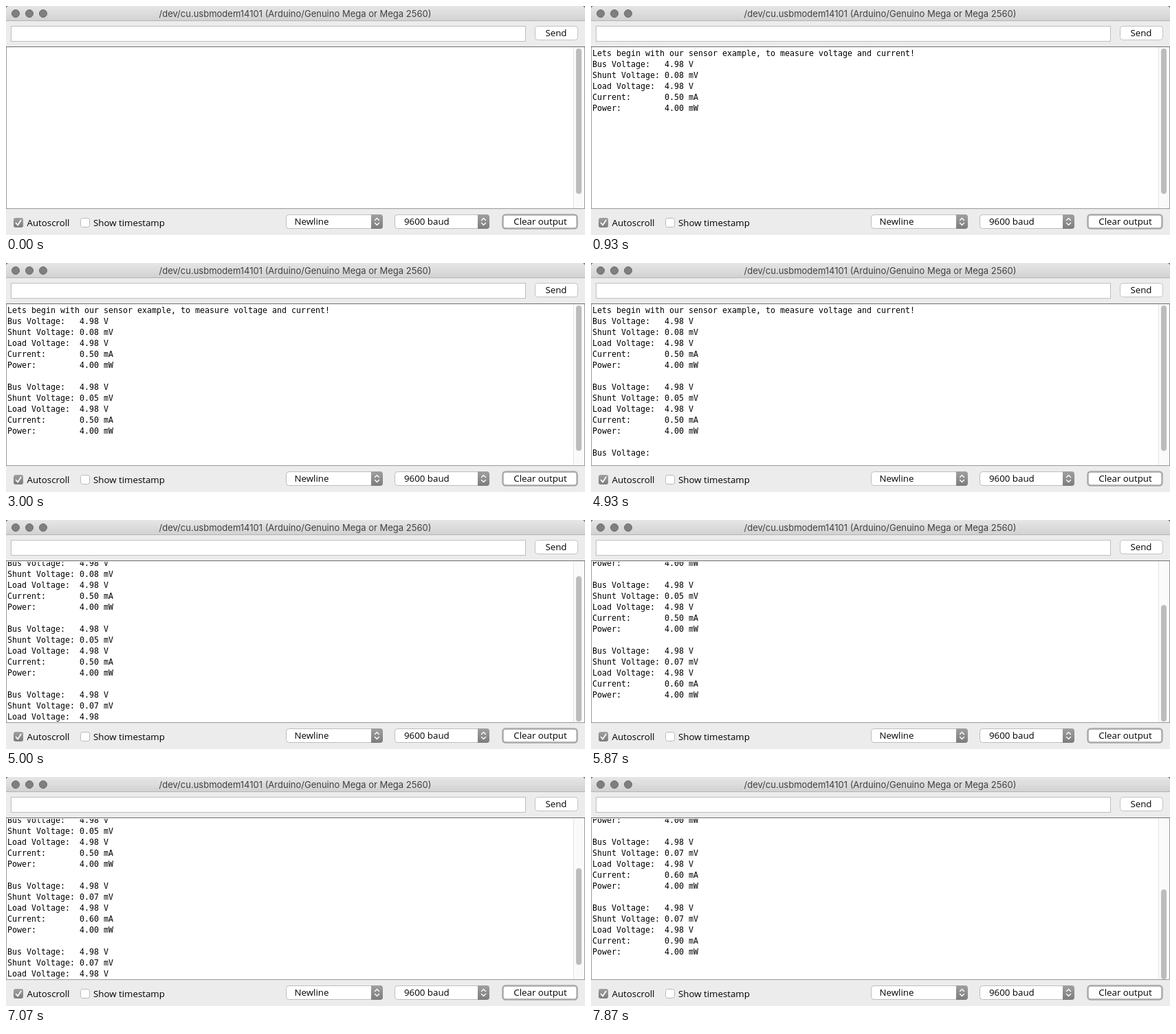
An HTML page for the animation above (8000 ms loop, 842x334 px).

```html
<!DOCTYPE html>
<html lang="en">
<head>
<meta charset="utf-8">
<title>Serial monitor</title>
<style>
  html, body { margin: 0; width: 100%; height: 100%; overflow: hidden; background: #ececec; }
  svg { position: absolute; left: 0; top: 0; }
  .ui { font: 500 13.3px "Open Sans", "Noto Sans", sans-serif; fill: #000; }
  .title { font: 13px Inter, "Liberation Sans", sans-serif; fill: #404040; }
  .mid { text-anchor: middle; }
  #view { position: absolute; left: 1px; top: 61px; width: 823px; height: 234px; overflow: hidden; }
  #log {
    position: absolute; left: 1px; top: 0; margin: 0; color: #000;
    font: 11.63px/16px "DejaVu Sans Mono", monospace;
  }
</style>
</head>
<body>
<svg width="842" height="334" viewBox="0 0 842 334">
  <defs>
    <linearGradient id="bar" x2="0" y2="1">
      <stop stop-color="#e6e6e6"/><stop offset="1" stop-color="#d2d2d2"/>
    </linearGradient>
    <linearGradient id="knob" x2="0" y2="1">
      <stop stop-color="#a0a0a0"/><stop offset="1" stop-color="#7c7c7c"/>
    </linearGradient>
    <g id="arrows">
      <path d="M0 0h13a4 4 0 0 1 4 4v13a4 4 0 0 1-4 4H0z" fill="url(#knob)"/>
      <path d="M5.5 8.5l3-3 3 3M5.5 12.5l3 3 3-3" fill="none" stroke="#fff" stroke-width="1.4"
        stroke-linecap="round" stroke-linejoin="round"/>
    </g>
  </defs>

  <rect width="842" height="334" fill="#ececec"/>
  <path d="M0 0h842v5a5 5 0 0 0-5-5H5a5 5 0 0 0-5 5z" fill="#777"/>
  <path d="M0 21V5a5 5 0 0 1 5-5h832a5 5 0 0 1 5 5v16z" fill="url(#bar)"/>
  <rect y="21" width="842" height="1" fill="#b4b4b4"/>
  <g fill="#7f7f7f" stroke="#6b6b6b">
    <circle cx="14" cy="11" r="5.5"/><circle cx="34" cy="11" r="5.5"/><circle cx="54" cy="11" r="5.5"/>
  </g>
  <text class="title mid" x="420.5" y="16">/dev/cu.usbmodem14101 (Arduino/Genuino Mega or Mega 2560)</text>

  <rect x="7.5" y="29.5" width="748" height="22" fill="#fff" stroke="#bebebe"/>
  <rect x="769.5" y="29.5" width="62" height="20" rx="4" fill="#fff" stroke="#c2c2c2"/>
  <text class="ui mid" x="800" y="44">Send</text>

  <rect x=".5" y="59.5" width="841" height="236" fill="#fff" stroke="#9a9a9a"/>
  <rect y="59" width="842" height="1" fill="#6e6e6e"/>
  <rect x="825" y="60" width="16" height="235" fill="#fafafa"/>
  <rect x="825" y="60" width="1" height="235" fill="#e6e6e6"/>
  <rect id="thumb" x="829" y="62" width="8" height="212" rx="4" fill="#bcbcbc"/>

  <rect x="11" y="309" width="14" height="14" rx="3" fill="url(#knob)"/>
  <path d="M14.5 316.5l2.6 3 4.6-7" fill="none" stroke="#fff" stroke-width="1.7" stroke-linecap="round"/>
  <text class="ui" x="30.5" y="321">Autoscroll</text>
  <rect x="108.5" y="309.5" width="13" height="13" rx="3" fill="#fff" stroke="#b9b9b9"/>
  <text class="ui" x="127" y="321">Show timestamp</text>

  <g fill="#fff" stroke="#bdbdbd">
    <rect x="407.5" y="304.5" width="140" height="20" rx="4"/>
    <rect x="565.5" y="304.5" width="137" height="20" rx="4"/>
  </g>
  <use href="#arrows" x="531" y="304"/>
  <use href="#arrows" x="686" y="304"/>
  <text class="ui" x="419.5" y="319">Newline</text>
  <text class="ui" x="579" y="319">9600 baud</text>
  <rect x="722.5" y="304.5" width="108" height="20" rx="4" fill="#fff" stroke="#a9a9a9" stroke-width="2.5"/>
  <text class="ui mid" x="777" y="319">Clear output</text>
</svg>
<div id="view"><pre id="log"></pre></div>

<script>
const LOOP = 8000, ROW = 16, VIEW = 234, TRACK = 232, TRACK_TOP = 62, MIN_ROWS = 16;

const reading = (shunt, current) => [
  ["Bus Voltage:", "4.98 V"],
  ["Shunt Voltage:", shunt + " mV"],
  ["Load Voltage:", "4.98 V"],
  ["Current:", current + " mA"],
  ["Power:", "4.00 mW"],
].map(([label, value]) => label.padEnd(15) + value + "\n").join("") + "\n";

const output = "Lets begin with our sensor example, to measure voltage and current!\n" +
  reading("0.08", "0.50") + reading("0.05", "0.50") +
  reading("0.07", "0.60") + reading("0.07", "0.90");

// [time, characters received, rows the scroll still lags behind]
const steps = [
  [0, 0], [730, 20], [800, 85], [870, 150], [930, 182],
  [2870, 194], [2930, 257], [3000, 296],
  [4930, 308], [5000, 360], [5070, 410],
  [6800, 422], [6870, 450], [7000, 472], [7070, 515, 2], [7130, 524],
];

const log = document.getElementById("log");
const thumb = document.getElementById("thumb");
let shown = null;

function show(step) {
  const [, count, lag = 0] = step;
  const text = output.slice(0, count);
  const rows = text.split("\n").length;
  const scroll = Math.max(0, (rows - lag) * ROW - VIEW);
  const scale = TRACK / (Math.max(rows, MIN_ROWS) * ROW);
  log.textContent = text;
  log.style.top = -scroll + "px";
  thumb.setAttribute("y", TRACK_TOP + Math.round(scroll * scale));
  thumb.setAttribute("height", Math.round(VIEW * scale));
}

function tick() {
  const time = performance.now() % LOOP;
  const step = steps.findLast(([start]) => start <= time);
  if (step !== shown) show(shown = step);
  requestAnimationFrame(tick);
}
tick();
</script>
</body>
</html>
```
